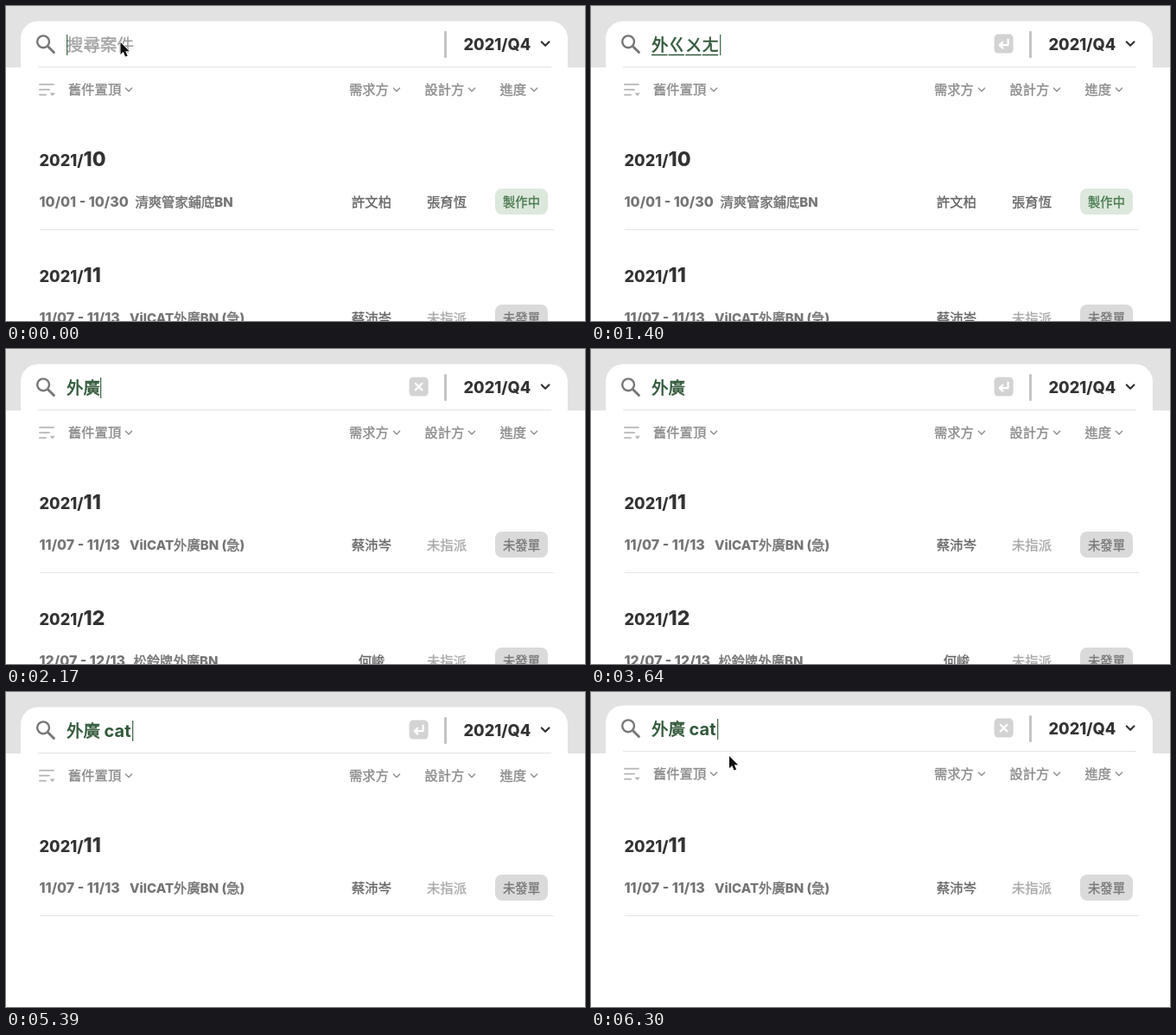
Write an HTML page that moves like this. It is 670x364 px and loops after 6370 ms.

```html
<!DOCTYPE html>
<html lang="zh-Hant">
<head>
<meta charset="utf-8">
<title>搜尋案件</title>
<style>
  html, body { margin: 0; width: 100%; height: 100%; overflow: hidden; background: #fff; }
  svg { display: block; width: 670px; height: 364px; }
  text { font-family: Inter, "Noto Sans CJK TC", "Noto Sans CJK", sans-serif; font-weight: 800; fill: currentColor; }
  /* A hairline stroke gives the regular face a medium weight. */
  .cjk { font-family: "Noto Sans CJK TC", "Noto Sans CJK", sans-serif; font-weight: 500; stroke: currentColor; stroke-width: .35px; }
  .line { fill: none; stroke-linecap: round; stroke-linejoin: round; }
  .typed { font-size: 19.5px; color: #32593b; }
  .typed.cjk { stroke-width: .6px; }
  .latin { font-size: 20px; font-weight: 700; }
  .hint { font-size: 19.5px; color: #a2a2a2; }
  .quarter { font-size: 18.2px; color: #333; }
  .filter { font-size: 15.3px; color: #8c8c8c; }
  .month { font-size: 18.2px; color: #333; }
  .month .big { font-size: 23px; }
  .date { font-size: 16px; color: #757575; }
  .title { font-size: 15px; color: #757575; }
  .title .cjk { stroke-width: .5px; }
  .title .cjk, .person { font-size: 15.3px; }
  .person { color: #666; }
  .none { color: #aaa; }
  .badge { font-size: 14.3px; }
</style>
</head>
<body>
<svg viewBox="0 0 670 364">
  <rect width="670" height="71" fill="#e2e2e2"/>
  <g id="panel">
    <rect x="17" y="17.6" width="633" height="400" rx="20" fill="#fff"/>
    <g class="line" stroke="#777">
      <circle cx="43.1" cy="41.3" r="6.9" stroke-width="2.4"/>
      <path d="M48.8 47L55.4 53.5" stroke-width="3"/>
    </g>
    <text id="hint" class="cjk hint" x="70" y="52.4">搜尋案件</text>
    <text id="typed" class="cjk typed" x="70" y="52.4"></text>
    <text id="latin" class="typed latin" x="113.6" y="51.6"></text>
    <path id="marks" stroke="#32593b" stroke-width="1.3"/>
    <rect id="caret" y="33" width="1.3" height="24" fill="#47704f"/>
    <g id="button" transform="translate(-.4 -.4)">
      <rect x="467" y="33" width="22" height="22" rx="4.5" fill="#d3d3d3"/>
      <path id="glyph" class="line" stroke="#fff" stroke-width="2.2"/>
    </g>
    <rect x="507" y="29" width="3" height="31" rx="1" fill="#c4c4c4"/>
    <text class="quarter" x="529.5" y="51.2">2021/Q4</text>
    <path class="line" d="M619.8 41.5l4.3 4.3 4.3-4.3" stroke="#333" stroke-width="2.2"/>
    <path d="M37 70.5H631" stroke="#e3e3e3"/>
    <path class="line" d="M39 90.7H55M39 96.7H50M39 102.7H46" stroke="#b4b4b4" stroke-width="1.8"/>
    <path d="M50.5 100.5h6.4l-3.2 3.6z" fill="#b4b4b4"/>
    <g id="filters"></g>
  </g>
  <g id="list"></g>
  <g id="arrow">
    <path d="M0 0V14L3.2 11.1 5.6 16.6 8.2 15.5 5.8 10.2H10.2Z" fill="#111" stroke="#fff" stroke-width="1.2" paint-order="stroke"/>
  </g>
  <g id="beam" class="line">
    <path d="M-3 -8Q0 -8 0 -6Q0 -8 3 -8M0 -6V6M-3 8Q0 8 0 6Q0 8 3 8M-1.7 2.5H1.7" stroke="#222" stroke-width="1.3"/>
  </g>
</svg>
<script>
const LOOP = 6370;
const $ = id => document.getElementById(id);

const filters = [['舊件置頂', 72, 142], ['需求方', 397, 452], ['設計方', 484.5, 539], ['進度', 571.5, 611]];
$('filters').innerHTML = filters.map(([label, x, tip]) =>
  `<text class="cjk filter" x="${x}" y="102.3">${label}</text>
   <path class="line" d="M${tip - 3.5} 95l3.5 3.5 3.5-3.5" stroke="#999" stroke-width="1.7"/>`).join('');

const jobs = {
  10: { date: '10/01 - 10/30', title: '清爽管家鋪底BN', x: 149.5, client: '許文柏', designer: '張育恆', status: '製作中' },
  11: { date: '11/07 - 11/13', title: 'VilCAT外廣BN (急)', x: 143, client: '蔡沛岑', status: '未發單' },
  12: { date: '12/07 - 12/13', title: '松鈴牌外廣BN', x: 147.5, client: '何峻', status: '未發單' }
};
const views = { all: [10, 11], ads: [11, 12], one: [11] };

const mixed = s => s.replace(/[\u3100-\u9fff]+/g, m => `<tspan class="cjk">${m}</tspan>`);

function jobMarkup(month, i) {
  const { date, title, x, client, designer, status } = jobs[month];
  const [fill, ink] = designer ? ['#dde8dd', '#4a7a50'] : ['#dadada', '#777'];
  return `<g transform="translate(0 ${i * 134})">
    <text class="month" x="38.5" y="184.5">2021/<tspan class="big">${month}</tspan></text>
    <text class="date" x="38.5" y="232.2">${date}</text>
    <text class="title" x="${x}" y="232.2">${mixed(title)}</text>
    <text class="cjk person" x="423" y="232.3" text-anchor="middle">${client}</text>
    <text class="cjk person ${designer ? '' : 'none'}" x="510" y="232.3" text-anchor="middle">${designer || '未指派'}</text>
    <rect x="566" y="211" width="61" height="30" rx="8" fill="${fill}"/>
    <text class="cjk badge" x="596.5" y="231.5" text-anchor="middle" color="${ink}">${status}</text>
    <path d="M39 258.5H634" stroke="#e6e6e6"/>
  </g>`;
}

const glyphs = {
  enter: 'M483 39V45.5H473.5M476.8 42L473.3 45.5 476.8 49',
  clear: 'M474.2 40.2L481.8 47.8M481.8 40.2L474.2 47.8'
};

// Each step changes part of the state from its time on.
const steps = [
  [0, { text: '', latin: '', marks: 0, caret: 70, icon: '', view: 'all', lift: 0, arrow: [132.5, 42], beam: null }],
  [210, { caret: 0 }],
  [700, { text: 'ㄨ', marks: 1, caret: 89, arrow: null }],
  [770, { icon: 'enter' }],
  [910, { text: 'ㄨㄞ', marks: 2, caret: 109 }],
  [1050, { text: '外', marks: 1, caret: 89 }],
  [1190, { text: '外ㄍㄨ', marks: 3, caret: 129 }],
  [1400, { text: '外ㄍㄨㄤ', marks: 4, caret: 149 }],
  [1540, { text: '外廣', marks: 2, caret: 109 }],
  [2030, { marks: 0 }],
  [2170, { view: 'ads', icon: 'clear' }],
  [2590, { caret: 0 }],
  [3080, { caret: 109 }],
  [3150, { caret: 113.5 }],
  [3220, { icon: 'enter' }],
  [3640, { caret: 0 }],
  [4200, { caret: 113.5 }],
  [4690, { latin: 'c', caret: 125.5 }],
  [4830, { latin: 'ca', caret: 137 }],
  [5040, { latin: 'cat', caret: 146 }],
  [5390, { view: 'one' }],
  [5530, { icon: 'clear' }],
  [5600, { caret: 0 }],
  [6090, { caret: 146, lift: 0.6, beam: [159, 69.5] }],
  [6160, { lift: 1, beam: null, arrow: [160, 73] }],
  [6230, { lift: 1.6, arrow: [160, 74] }],
  [6300, { lift: 2 }]
];

const show = (el, on) => el.style.display = on ? '' : 'none';
function place(el, at) {
  show(el, at);
  if (at) el.setAttribute('transform', `translate(${at})`);
}

function render(s) {
  show($('hint'), !s.text);
  $('typed').textContent = s.text;
  $('latin').textContent = s.latin;
  let d = '';
  for (let i = 0; i < s.marks; i++) d += `M${70 + i * 19.6} 56.5h18.4`;
  $('marks').setAttribute('d', d);
  show($('caret'), s.caret);
  $('caret').setAttribute('x', s.caret);
  show($('button'), s.icon);
  $('glyph').setAttribute('d', glyphs[s.icon] || '');
  $('panel').setAttribute('transform', `translate(0 ${-s.lift})`);
  $('list').innerHTML = views[s.view].map(jobMarkup).join('');
  place($('arrow'), s.arrow);
  place($('beam'), s.beam);
}

const start = performance.now();
let last = 0;
function tick() {
  const t = (performance.now() - start) % LOOP;
  const count = steps.filter(([at]) => at <= t).length;
  if (count !== last) {
    last = count;
    render(Object.assign({}, ...steps.slice(0, count).map(step => step[1])));
  }
  requestAnimationFrame(tick);
}
tick();
</script>
</body>
</html>
```
